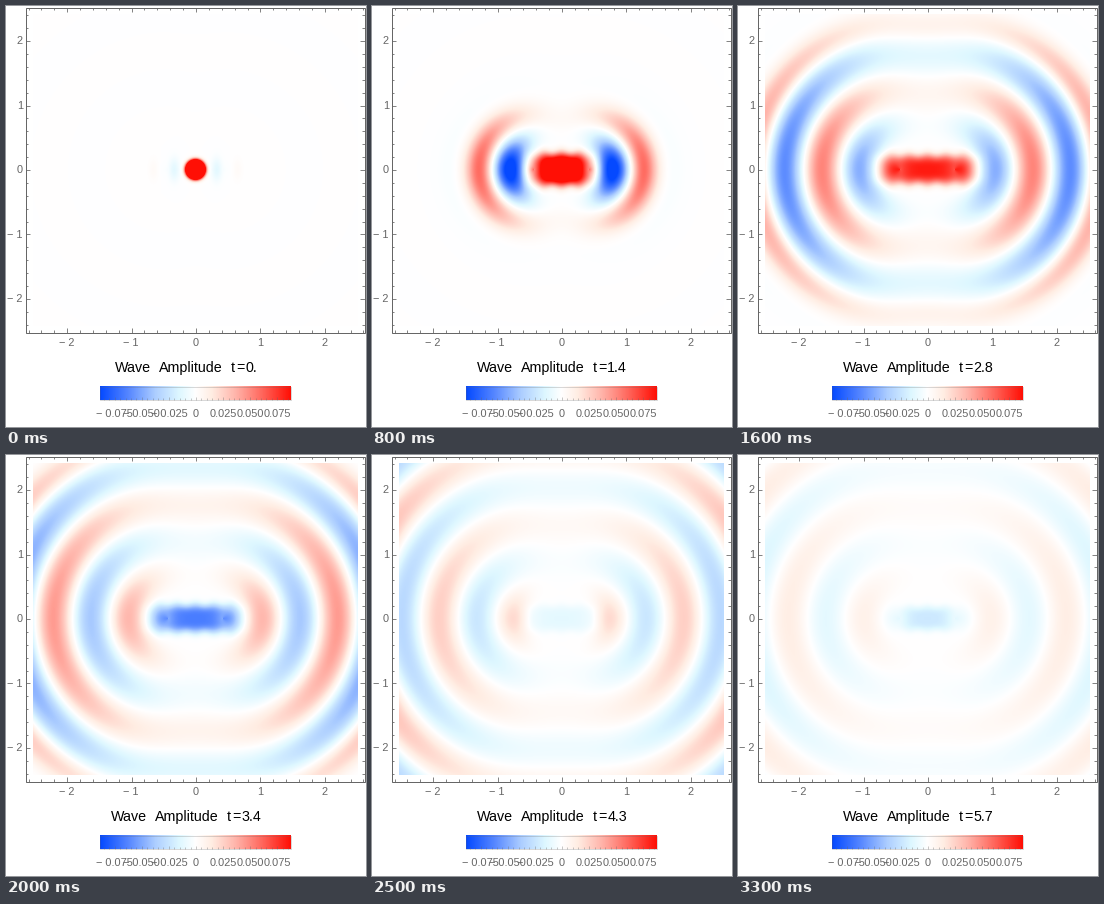
These frames come from a looping animation (360x421 px, 3.4 s). A matplotlib script:

```python
import numpy as np
import matplotlib.pyplot as plt
from matplotlib.animation import FuncAnimation
from matplotlib.colors import LinearSegmentedColormap
from matplotlib.patches import Rectangle

W, H, DPI = 360, 421, 64
CX, CY, UNIT = 189.5, 163.5, 64.4        # plot origin and pixels per unit
X0, X1, Y0, Y1 = 27, 352, 8, 320         # area covered by the field
BAR = (94, 380, 191, 14)
LIMIT = 0.088
STEP = 0.284                             # time between two pictures
GREY = "#666666"

plt.rcParams["font.family"] = "Liberation Sans"

STOPS = [(-0.088, (0.02, 0.29, 1.0)), (-0.062, (0.34, 0.53, 1.0)),
         (-0.037, (0.68, 0.81, 1.0)), (-0.015, (0.87, 0.97, 1.0)),
         (0.0, (1.0, 1.0, 1.0)), (0.015, (1.0, 0.93, 0.89)),
         (0.037, (1.0, 0.71, 0.67)), (0.062, (1.0, 0.40, 0.36)),
         (0.088, (1.0, 0.06, 0.02))]
CMAP = LinearSegmentedColormap.from_list(
    "wave", [((v + LIMIT) / (2 * LIMIT), c) for v, c in STOPS], N=512)

x, y = np.meshgrid((np.arange(X0, X1) + 0.5 - CX) / UNIT,
                   (CY - np.arange(Y0, Y1) - 0.5) / UNIT)
core = 1 - np.exp(-(np.hypot(x, y) / 0.55) ** 4)

END = 0.42                               # half distance of the two emitters
KEYS = [0, 0.6, 1.42, 2.27, 2.84, 3.98, 5.68]
LENGTHS = [0.145, 0.27, 0.43, 0.66, 0.65, 0.53, 0.43]
HEIGHTS = [0.145, 0.20, 0.25, 0.24, 0.23, 0.21, 0.19]


def rings(t, side):
    """Damped wave train from one end of the bar, beamed outwards."""
    dx = side * x - END
    dist = np.hypot(dx, y)
    path = END + dist
    xi = t - path
    front = 1 / (1 + np.exp(-np.clip((xi - 0.06) / 0.12, -60, 60)))
    decay = np.exp(-0.52 * np.clip(xi, -1, None))
    beam = ((1 + dx / np.maximum(dist, 1e-6)) / 2) ** 2.4
    amp = 0.125 * front * decay * beam * core / np.sqrt(path)
    return amp * np.cos(2 * np.pi * (xi - 0.05) / 1.16)


def source(t):
    """Oscillating bar in the middle, growing out of a disc."""
    length = np.interp(t, KEYS, LENGTHS)
    height = np.interp(t, KEYS, HEIGHTS)
    wobble = 1 + 0.04 * min(t / 1.4, 1) * np.cos(2 * np.pi * x / 0.29)
    m = min(3.5, 2 + t)
    q = np.abs(x / length) ** m + np.abs(y / (height * wobble)) ** m
    level = 0.40 * np.exp(-0.505 * t) * np.cos(
        2 * np.pi * (max(t, 0.3) - 2.75) / 1.17)
    return level * np.exp(-q ** (3.5 / m))


def ripples(t):
    """Faint side lobes of the first pulse."""
    def lobe(pos):
        return np.exp(-((np.abs(x) - pos) / 0.08) ** 2 - (y / 0.18) ** 2)
    return np.exp(-8 * t) * (0.004 * lobe(0.65) - 0.012 * lobe(0.33))


def field(t):
    return rings(t, 1) + rings(t, -1) + source(t) + ripples(t)


fig = plt.figure(figsize=(W / DPI, H / DPI), dpi=DPI, facecolor="white")
ax = fig.add_axes([0, 0, 1, 1])


def text(px, py, s, size, color, ha="center"):
    return ax.text(px, py, s, fontsize=size * 72 / DPI, color=color, ha=ha,
                   va="baseline")


def line(xs, ys, width=0.8, alpha=1.0):
    ax.plot(xs, ys, color=GREY, lw=width * 72 / DPI, alpha=alpha,
            solid_capstyle="butt")


def number(v, digits=0):
    s = f"{abs(v):.{digits}f}" if v else "0"
    return "\u2212 " + s if v < 0 else s


def draw_frame():
    left, right, top, bottom = 19.5, 358.5, 1.5, 326.5
    ax.add_patch(Rectangle((left, top), right - left, bottom - top, fill=False,
                           ec=GREY, lw=72 / DPI))
    for i in range(-13, 14):
        size = 4.5 if i % 5 == 0 else 2.5
        px = int(CX + i / 5 * UNIT) + 0.5
        py = int(CY - i / 5 * UNIT) + 0.5
        if left < px < right:
            line([px, px], [top, top + size])
            line([px, px], [bottom, bottom - size])
        if top < py < bottom:
            line([left, left + size], [py, py])
            line([right, right - size], [py, py])
    for v in range(-2, 3):
        text(CX + v * UNIT, 340.3, number(v), 11, GREY)
        text(16.8, CY - v * UNIT + 3.8, number(v), 11, GREY, "right")


def draw_bar():
    bx, by, bw, bh = BAR
    ax.imshow(np.linspace(-LIMIT, LIMIT, bw)[None, :], cmap=CMAP, vmin=-LIMIT,
              vmax=LIMIT, extent=(bx, bx + bw, by + bh, by), aspect="auto",
              interpolation="nearest")
    ax.add_patch(Rectangle((bx, by + 0.5), bw, bh - 1, fill=False, ec=GREY,
                           lw=0.5 * 72 / DPI, alpha=0.5))
    mid, per = bx + bw / 2 + 0.5, 27.1
    for i in range(-17, 18):
        px = mid + i * per / 5
        size = 3.5 if i % 5 == 0 else 2
        line([px, px], [by + bh, by + bh - size], 0.6, alpha=0.6)
    for i in range(-3, 4):
        text(mid + i * per, 411, number(i * 0.025, 3), 11, GREY)


image = ax.imshow(field(0), cmap=CMAP, vmin=-LIMIT, vmax=LIMIT,
                  extent=(X0, X1, Y1, Y0), aspect="auto",
                  interpolation="nearest")
draw_frame()
draw_bar()
ax.set_xlim(0, W)
ax.set_ylim(H, 0)
ax.axis("off")

# word offsets from the left end of the title
WORDS = [("Wave", 0), ("Amplitude", 44), ("t", 115), ("=", 120.5), ("", 130)]
title = [text(0, 366, s, 14.3, "black", "left") for s, _ in WORDS]


def label(t):
    s = f"{t:.2g}"
    return s if "." in s else s + "."


def update(k):
    t = (3 * k + 2) // 5 * STEP
    image.set_data(field(t))
    value = label(t)
    width = 14.3 * (0.556 * (len(value) - 1) + 0.278)
    start = 180.3 - (130 + width) / 2
    for part, (_, dx) in zip(title, WORDS):
        part.set_x(start + dx)
    title[-1].set_text(value)
    return [image, *title]


anim = FuncAnimation(fig, update, frames=34, interval=100, repeat=True,
                     repeat_delay=0, blit=False)
plt.show()
```
